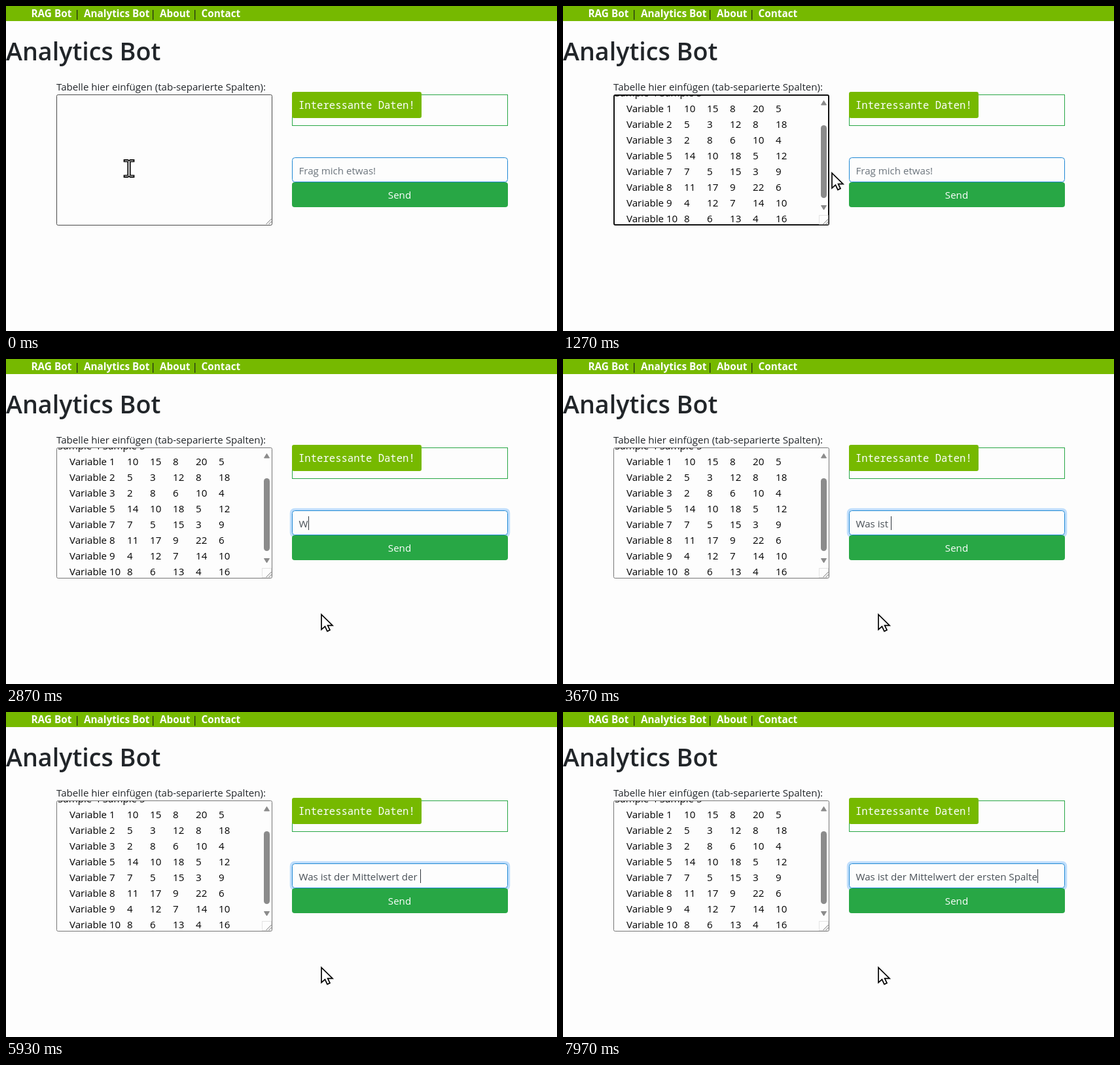
An HTML page for the animation above (8 s loop, 842x496 px).

```html
<!DOCTYPE html>
<html lang="de">
<head>
<meta charset="utf-8">
<title>Analytics Bot</title>
<style>
  html, body { margin: 0; width: 100%; height: 100%; overflow: hidden; background: #fdfdfd; }
  svg { display: block; width: 842px; height: 496px; }
  text { font: 15.1px "Open Sans", "Noto Sans", sans-serif; fill: #212529; white-space: pre; }
  .nav text { font-weight: 700; font-size: 15.3px; fill: #fff; }
  .nav .bar { font-weight: 400; fill: #101418; }
  .title { font-size: 37.7px; font-weight: 600; }
  .bubble { font: 15.6px "Noto Sans Mono", "DejaVu Sans Mono", monospace; fill: #fff; }
  .table text { fill: #000; }
  .send { fill: #fff; text-anchor: middle; }
  .cursor { fill: #fff; stroke: #000; stroke-width: 1.7; }
</style>
</head>
<body>
<svg viewBox="0 0 842 496">
  <rect width="842" height="496" fill="#fdfdfd"/>
  <g class="nav">
    <rect width="842" height="23" fill="#76b900"/>
    <text x="38.500" y="17">RAG Bot</text><text class="bar" x="104.500" y="17">|</text>
    <text x="119" y="17">Analytics Bot</text><text class="bar" x="220.500" y="17">|</text>
    <text x="235" y="17">About</text><text class="bar" x="284.500" y="17">|</text>
    <text x="298.500" y="17">Contact</text>
  </g>
  <text class="title" x="0" y="83">Analytics Bot</text>
  <text x="77" y="129">Tabelle hier einfügen (tab-separierte Spalten):</text>

  <rect id="area" fill="none"/>
  <clipPath id="areaClip"><rect x="78" y="136" width="328" height="198"/></clipPath>
  <g id="table" class="table" clip-path="url(#areaClip)">
    <rect x="394" y="182" width="9" height="111" rx="4.5" fill="#8b8b8b"/>
    <path d="M394.5 151L398.5 144.5L402.5 151ZM394.5 304.500L398.5 311L402.5 304.500Z"
      fill="#8b8b8b" stroke="#8b8b8b" stroke-linejoin="round"/>
    <rect x="391.500" y="319.500" width="14" height="14" fill="none" stroke="#c8c8c8" stroke-dasharray="1 1"/>
  </g>
  <path d="M397.500 333L405.500 325M401.500 333L405.500 329" stroke="#707070" fill="none"/>

  <rect x="437.500" y="135.500" width="329" height="47" fill="none" stroke="#28a745"/>
  <rect x="437" y="131" width="198" height="40" rx="3" fill="#76b900"/>
  <text class="bubble" x="447" y="157">Interessante Daten!</text>

  <rect id="glow" x="435.500" y="229.500" width="333" height="41" rx="5.500" fill="none" stroke="#bfdefc" stroke-width="3.500"/>
  <rect x="437.500" y="231.500" width="329" height="37" rx="4" fill="#fdfdfd" stroke="#1f88d4"/>
  <text id="entry" x="447.500" y="257"></text>
  <rect id="caret" y="240" width="1" height="21" fill="#30363c"/>
  <rect x="437" y="269" width="330" height="38" rx="4" fill="#28a745"/>
  <text class="send" x="601.500" y="294">Send</text>

  <path id="beam" class="cursor"
    d="M-7.500 -13.200H-2L0 -12L2 -13.200H7.500V-10.500H1.700V10.500H7.500V13.200H2L0 12L-2 13.200H-7.500V10.500H-1.700V-10.500H-7.500Z"/>
  <path id="arrow" class="cursor" d="M0 1V24L5.500 19.200L9 26.500L13 24.600L9.600 17.600H17Z"/>
</svg>
<script>
const LOOP = 8000, AREA_FOCUS = 300, PASTE = 700, INPUT_FOCUS = 1800, BLINK = 530;
const QUESTION = 'Was ist der Mittelwert der ersten Spalte';
const ROWS = [
  [1, 10, 15, 8, 20, 5], [2, 5, 3, 12, 8, 18], [3, 2, 8, 6, 10, 4], [5, 14, 10, 18, 5, 12],
  [7, 7, 5, 15, 3, 9], [8, 11, 17, 9, 22, 6], [9, 4, 12, 7, 14, 10], [10, 8, 6, 13, 4, 16]
];
// [time, characters typed]
const TYPING = [[2750, 0], [3600, 8], [4480, 16], [5650, 27], [6050, 27], [7850, 40]];
// [time, x, y] of the pointer's hot spot
const POINTER = [[0, 188, 248], [850, 188, 248], [1200, 411, 253], [1300, 411, 254], [1650, 490, 252],
  [1850, 490, 252], [2130, 486, 366], [2200, 486, 366], [2420, 482, 389]];

const $ = id => document.getElementById(id);
const set = (el, attrs) => { for (const key in attrs) el.setAttribute(key, attrs[key]); };
const show = (el, on) => { el.style.display = on ? '' : 'none'; };

function addText(x, y, content) {
  const el = document.createElementNS('http://www.w3.org/2000/svg', 'text');
  set(el, { x, y });
  el.textContent = content;
  $('table').append(el);
}

addText(79, 138, 'Sample 4 Sample 5');
ROWS.forEach(([id, ...values], row) => {
  const y = 162 + row * 24;
  addText(97, y, 'Variable ' + id);
  values.forEach((value, col) => addText(185 + col * 35, y, value));
});

function sample(steps, t, ease = k => k) {
  const next = steps.findIndex(step => step[0] > t);
  if (next < 0) return steps.at(-1).slice(1);
  if (next === 0) return steps[0].slice(1);
  const a = steps[next - 1], b = steps[next];
  const k = ease((t - a[0]) / (b[0] - a[0]));
  return a.slice(1).map((v, i) => v + (b[i + 1] - v) * k);
}

const smooth = k => k * k * (3 - 2 * k);
const inside = (x, y, l, t, r, b) => x > l && x < r && y > t && y < b;

function drawArea(t, hovered) {
  const focused = t >= AREA_FOCUS && t < INPUT_FOCUS;
  const inset = focused ? 1 : 0.5;
  set($('area'), {
    x: 77 + inset, y: 135 + inset, width: 330 - 2 * inset, height: 200 - 2 * inset, rx: 2,
    stroke: focused ? '#101010' : hovered ? '#4a4a4a' : '#767676',
    'stroke-width': 2 * inset
  });
  show($('table'), t >= PASTE);
}

function drawInput(t) {
  const focused = t >= INPUT_FOCUS;
  const count = Math.floor(sample(TYPING, t)[0] + 1e-6);
  const entry = $('entry');
  entry.textContent = count ? QUESTION.slice(0, count) : 'Frag mich etwas!';
  entry.style.fill = count ? '#495057' : '#6c757d';
  show($('glow'), focused);
  const blinkOn = Math.floor((t - INPUT_FOCUS) / BLINK) % 2 === 0;
  show($('caret'), focused && (count > 0 || blinkOn));
  set($('caret'), { x: Math.round(448 + (count ? entry.getComputedTextLength() : 0)) });
}

function draw(t) {
  const [x, y] = sample(POINTER, t, smooth);
  const overArea = inside(x, y, 77, 135, 407, 335);
  const overText = overArea || inside(x, y, 437, 231, 767, 269);
  drawArea(t, overArea);
  drawInput(t);
  for (const id of ['beam', 'arrow']) {
    show($(id), (id === 'beam') === overText);
    set($(id), { transform: `translate(${Math.round(x)} ${Math.round(y)})` });
  }
}

const start = performance.now();
function frame() {
  draw((performance.now() - start) % LOOP);
  requestAnimationFrame(frame);
}
frame();
</script>
</body>
</html>
```
